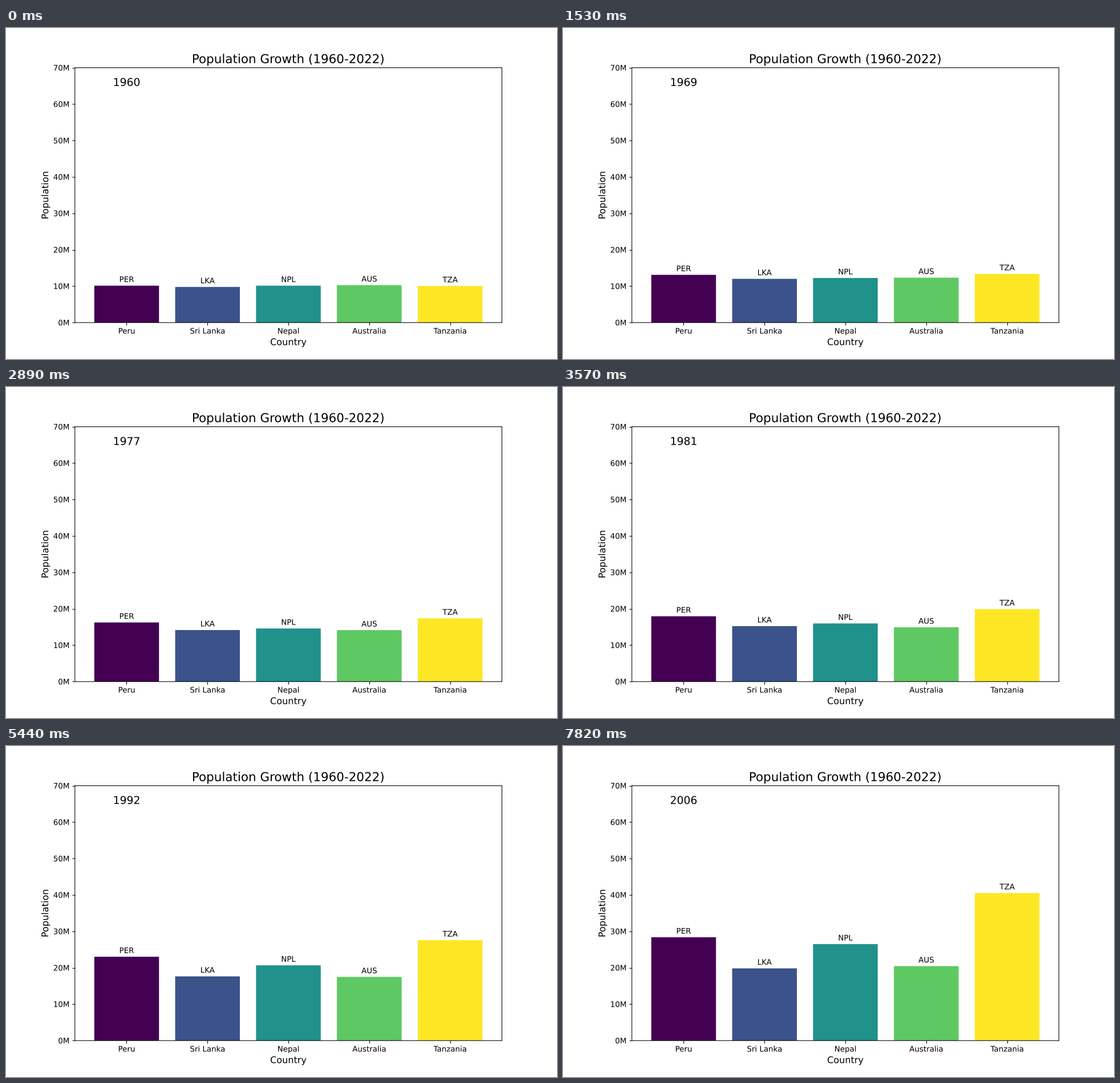
Write a matplotlib script that moves like this. It is 966x580 px and loops after 7990 ms.

```python
import matplotlib.pyplot as plt
import numpy as np
from matplotlib import patheffects
from matplotlib.animation import FuncAnimation

DPI = 96.6
FIRST, LAST = 1960, 2006

# Millions of people at a few key years; growth is geometric in between
KEY_YEARS = [1960, 1973, 1981, 1992, 1999, 2006]
COUNTRIES = {
    "Peru": ("PER", [10.14, 14.70, 17.94, 23.03, 26.27, 28.38]),
    "Sri Lanka": ("LKA", [9.79, 13.16, 15.23, 17.64, 18.63, 19.84]),
    "Nepal": ("NPL", [10.14, 13.32, 15.97, 20.67, 24.13, 26.50]),
    "Australia": ("AUS", [10.28, 13.38, 14.92, 17.49, 18.81, 20.45]),
    "Tanzania": ("TZA", [10.06, 15.17, 19.91, 27.58, 33.46, 40.53]),
}


def population(year, keys):
    return np.exp(np.interp(year, KEY_YEARS, np.log(keys)))


# Smooth edges and outline text, so nothing is rounded to whole pixels
plt.rcParams.update({
    "font.family": "DejaVu Sans",
    "text.hinting": "none",
    "path.snap": False,
    "path.effects": [patheffects.Normal()],
})
fig, ax = plt.subplots(figsize=(10, 6.00415), dpi=DPI)

colors = plt.cm.viridis(np.linspace(0, 1, len(COUNTRIES)))
codes, series = zip(*COUNTRIES.values())
bars = ax.bar(list(COUNTRIES), [keys[0] for keys in series], color=colors)
labels = [ax.text(i, 0, code, ha="center") for i, code in enumerate(codes)]
year_text = ax.text(0, 65, str(FIRST), fontsize=14, ha="center")

ax.set_ylim(0, 70)
ax.set_yticks(range(0, 71, 10))
ax.yaxis.set_major_formatter(lambda value, _: f"{value:.0f}M")
ax.set_title("Population Growth (1960-2022)", fontsize=16)
ax.set_xlabel("Country", fontsize=12)
ax.set_ylabel("Population", fontsize=12)


def update(frame):
    year = FIRST + frame
    for bar, label, keys in zip(bars, labels, series):
        height = population(year, keys)
        bar.set_height(height)
        label.set_y(height + 1)
    year_text.set_text(str(year))
    return [*bars, *labels, year_text]


anim = FuncAnimation(fig, update, frames=LAST - FIRST + 1, interval=170,
                     repeat=True, repeat_delay=0, blit=False)
plt.show()
```
